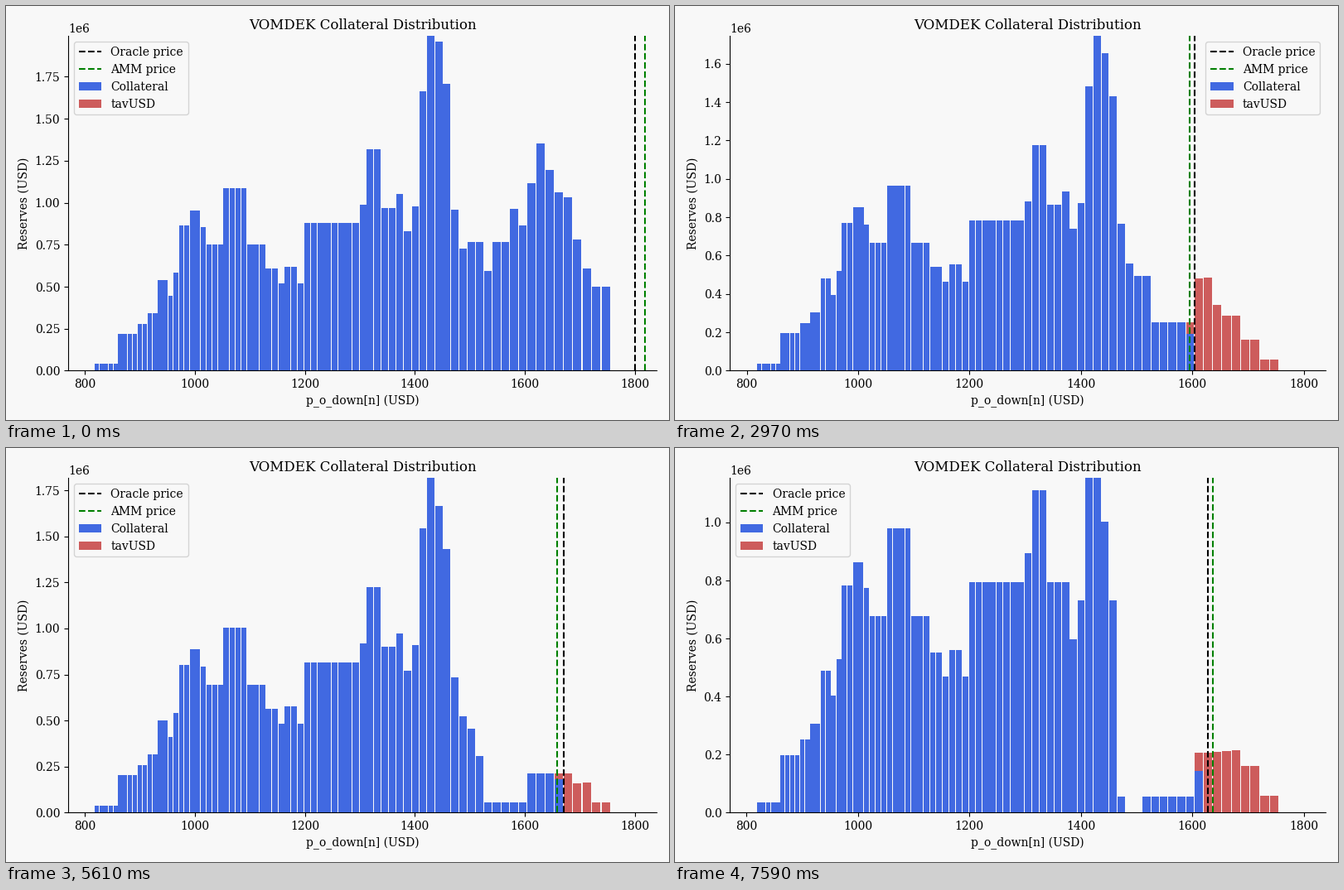
A matplotlib script for the animation above (7920 ms loop, 800 by 500 pixels).

```python
import numpy as np
import matplotlib.pyplot as plt
from matplotlib.animation import FuncAnimation

BG = "#f8f8f8"
FRAMES, INTERVAL = 24, 330
BANDS = 78
STEP = 0.99          # price ratio between neighbouring bands
LOWEST = 822.2       # price of the lowest band
PEG = 1800.2         # price at which loan sizes are quoted

plt.rcParams.update({
    "font.family": "DejaVu Serif",
    "font.size": 10,
    "figure.facecolor": BG,
    "axes.facecolor": BG,
    "axes.spines.top": False,
    "axes.spines.right": False,
})

# Oracle price at every step
ORACLE = [1800.2, 1600, 1563, 1585, 1594, 1603, 1617.6, 1608,
          1606, 1604, 1632, 1634, 1686.2, 1692, 1688, 1762,
          1761, 1670.2, 1612, 1560, 1483.5, 1483.8, 1600, 1627.8]

# A loan spreads its size evenly: (first band, last band, millions per band)
KEPT = [
    (0, 20, .04), (5, 57, .18), (9, 58, .06), (11, 20, .06), (13, 21, .105),
    (13, 14, .095), (16, 31, .14), (17, 57, .28), (19, 33, .09),
    (25, 28, .335), (35, 36, .1), (38, 51, .22), (38, 57, .14),
    (46, 48, .11), (47, 48, .24), (53, 57, .15), (54, 56, .3),
    (54, 55, .165), (61, 75, .06), (67, 73, .11), (67, 71, .06),
]

# Loans paid back between two steps
REPAID = {
    (0, 2): [(60, 71, .11), (63, 72, .17), (65, 75, .2), (68, 75, .24)],
    (2, 6): [(55, 70, .034), (62, 65, .1)],
    (6, 12): [(56, 69, .13)],
    (12, 17): [(61, 68, .16), (67, 71, .08)],
    (17, 21): [(57, 61, .05)],
    (21, 23): [(47, 58, .09), (51, 58, .08), (54, 60, .22),
               (55, 59, .293), (60, 61, .22)],
}

band = np.arange(BANDS)
price = LOWEST * STEP ** -band
width = 0.9 * price * (1 / STEP - 1)
left = price[0] - width[0] / 2
right = price[-1] + width[-1] / 2
margin = 0.05 * (right - left)


def spread(loans):
    return sum(size * ((band >= lo) & (band <= hi)) for lo, hi, size in loans)


def sizes(i):
    """Collateral units held in each band at step i."""
    total = spread(KEPT)
    for span, loans in REPAID.items():
        total = total + spread(loans) * np.interp(i, span, (1, 0))
    return total * 1e6 / PEG


def amm_price(i):
    """The AMM overshoots the oracle in the direction of the last move."""
    p = ORACLE[i]
    move = (p - ORACLE[i - 1]) / p
    return p * (1 + np.sign(move) * (0.0052 + move ** 2 / 2))


def reserves(i):
    """Split each band into collateral and stablecoin value."""
    p, a = ORACLE[i], amm_price(i)
    active = np.log(p * np.sqrt(p / a) / LOWEST) / -np.log(STEP)
    share = np.clip(active - band, 0, 1)
    size = sizes(i)
    return size * share * p, size * (1 - share) * price


fig, ax = plt.subplots(figsize=(8, 5), dpi=100)


def draw(i):
    ax.clear()
    coll, stable = reserves(i)

    ax.bar(price, coll, width, color="royalblue", label="Collateral")
    ax.bar(price, stable, width, bottom=coll, color="indianred",
           label="tavUSD")
    ax.axvline(ORACLE[i], color="black", linestyle="--", label="Oracle price")
    ax.axvline(amm_price(i), color="green", linestyle="--", label="AMM price")

    ax.set_xlim(left - margin, right + margin)
    ax.set_ylim(0, (coll + stable).max())
    ax.set_title("VOMDEK Collateral Distribution")
    ax.set_xlabel("p_o_down[n] (USD)")
    ax.set_ylabel("Reserves (USD)")
    ax.legend(loc="best")

    # Start every layout from the same margins
    fig.subplots_adjust(left=0.125, right=0.9, bottom=0.11, top=0.88)
    fig.tight_layout()
    return []


anim = FuncAnimation(fig, draw, frames=FRAMES, interval=INTERVAL,
                     repeat=True, repeat_delay=0, blit=False)
plt.show()
```
